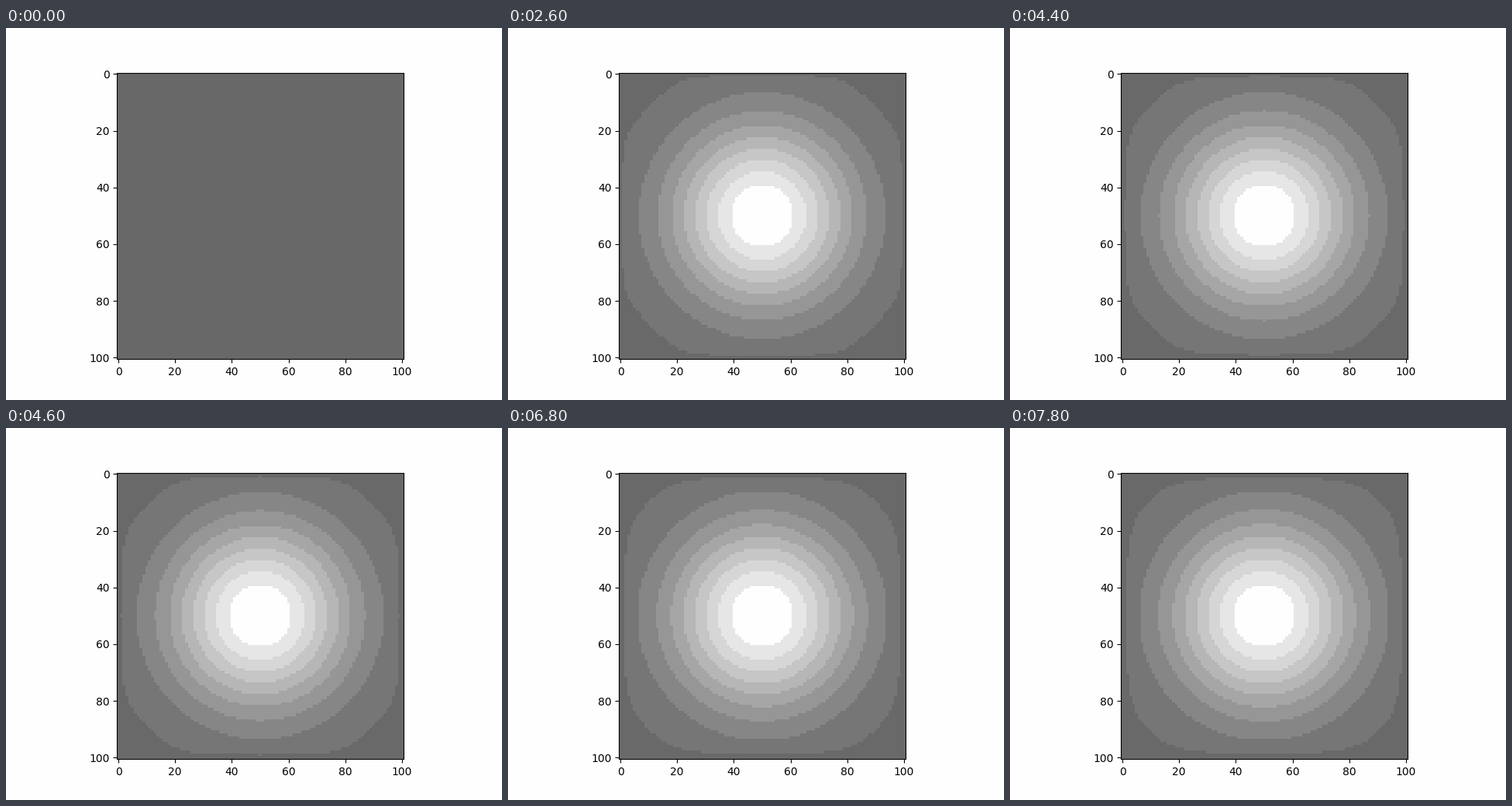
Recreate the animation shown at these times as a matplotlib script. Size 640 by 480 pixels, loop 8 s.

```python
import numpy as np
import matplotlib.pyplot as plt
from matplotlib.animation import FuncAnimation

N = 101            # grid points per side
FRAMES = 40
SPREAD = 0.0029    # diffusion time grows with the frame number squared
LOW, SPAN = 0.6893, 1.684
DARK, FLAT, WHITE = 106, 104, 254
PAGE = "#fefefe"

cells = np.arange(N)
modes = np.sin(np.pi * np.outer(cells, cells) / (N - 1))
decay = 2 - 2 * np.cos(np.pi * cells / (N - 1))
hump = np.exp(-(cells - N // 2) ** 2 / 1000)
weights = modes.T @ hump * 2 / (N - 1)


def field(n):
    """Gaussian hump diffusing in a square whose border is held at zero."""
    profile = modes @ (weights * np.exp(-decay * SPREAD * n * n))
    return np.outer(profile, profile)


def shade(n):
    """Gray picture in sixteen-step bands, scaled to the current peak."""
    if n == 0:
        return np.full((N, N), FLAT)
    u = field(n)
    band = np.floor(16 * (u + LOW) / (u.max() + SPAN - 1))
    return np.where(band >= 15, WHITE, np.maximum(16 * band + 6, DARK))


pictures = [shade(n) for n in range(FRAMES)]

fig, ax = plt.subplots(figsize=(6.4, 4.8), dpi=100, facecolor=PAGE)
image = ax.imshow(pictures[0], cmap="gray", vmin=0, vmax=255,
                  interpolation="nearest")


def draw(n):
    image.set_data(pictures[n])
    return [image]


anim = FuncAnimation(fig, draw, frames=FRAMES, interval=200,
                     repeat=True, repeat_delay=0)
plt.show()
```
